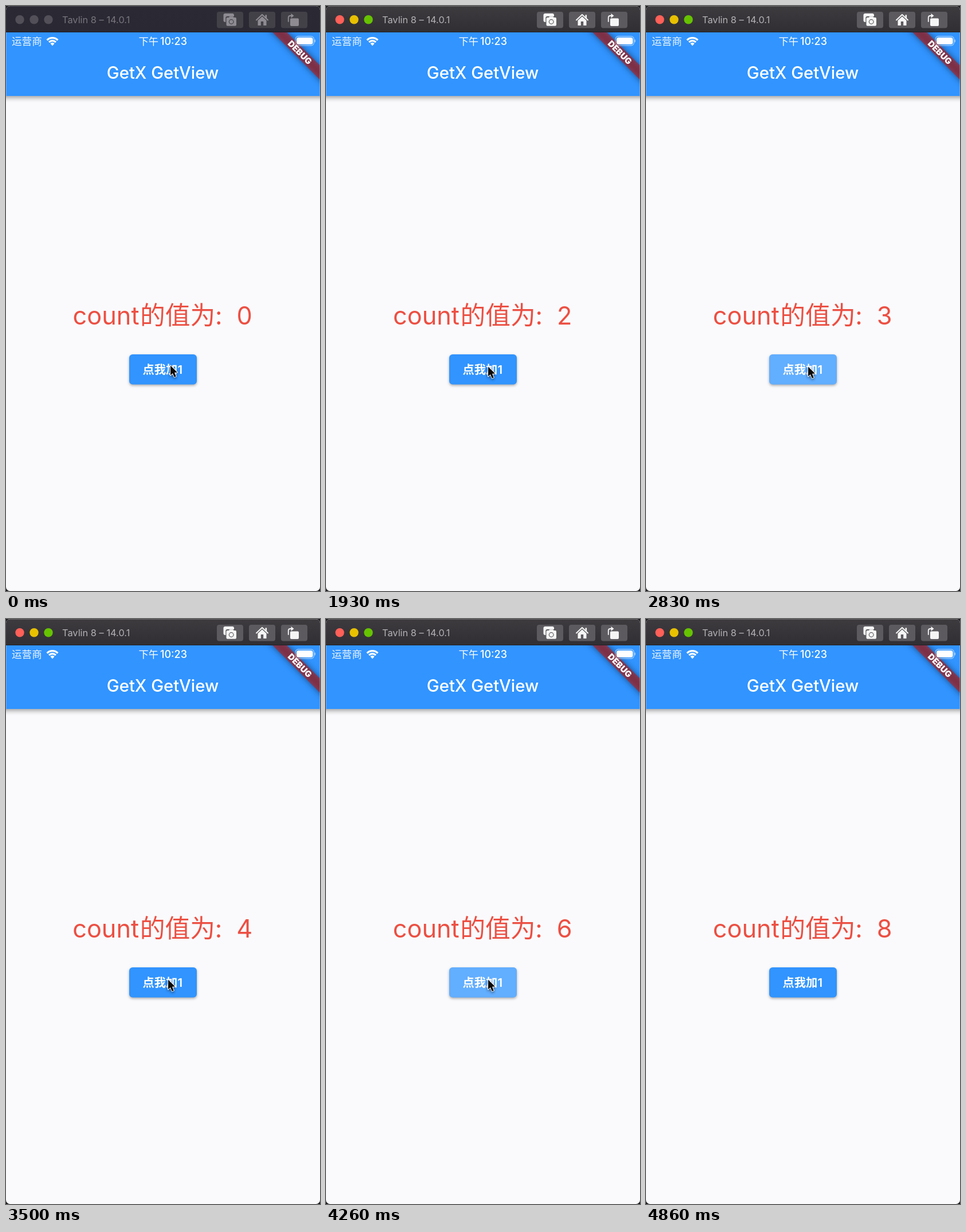
Write an HTML page with a canvas that moves like this. It is 548x1021 px and loops after 5.43 s.

```html
<!DOCTYPE html>
<html lang="zh-CN">
<head>
<meta charset="utf-8">
<title>GetX GetView</title>
<style>
html, body { margin: 0; width: 100%; height: 100%; overflow: hidden; background: #18181c; }
canvas { display: block; width: 548px; height: 1021px; }
</style>
</head>
<body>
<canvas id="stage" width="548" height="1021"></canvas>
<script>
const W = 548, H = 1021, LOOP = 5430;
const ctx = document.getElementById('stage').getContext('2d');
const LATIN = 'Inter, "Noto Sans CJK SC", "Noto Sans CJK", sans-serif';
const CJK = '"Noto Sans CJK SC", "Noto Sans CJK", sans-serif';
const BLUE = '#3194ff', RED = '#ec4f42';

// Each tap: time the counter steps, start of its ripple.
const TAPS = [
  [1270, 1055], [1930, 1930], [2700, 2700], [3500, 3500],
  [3790, 3790], [4120, 4120], [4290, 4290], [4460, 4460]
];
const BTN = { x: 215, y: 608, w: 118, h: 52.5, r: 6 };

const clamp = v => Math.max(0, Math.min(1, v));
const mix = (a, b, p) => a + (b - a) * p;
const easeOut = p => 1 - Math.pow(1 - clamp(p), 2.4);

function box(x, y, w, h, r, fill) {
  ctx.beginPath();
  ctx.roundRect(x, y, w, h, r);
  ctx.fillStyle = fill;
  ctx.fill();
}

function disc(x, y, r, fill) {
  ctx.beginPath();
  ctx.arc(x, y, r, 0, Math.PI * 2);
  ctx.fillStyle = fill;
  ctx.fill();
}

function poly(points, fill) {
  ctx.beginPath();
  points.forEach(([x, y]) => ctx.lineTo(x, y));
  ctx.closePath();
  ctx.fillStyle = fill;
  ctx.fill();
}

function text(str, x, y, font, fill, align = 'left') {
  ctx.font = font;
  ctx.fillStyle = fill;
  ctx.textAlign = align;
  ctx.fillText(str, x, y);
}

function shadow(color, blur, dy) {
  ctx.shadowColor = color;
  ctx.shadowBlur = blur;
  ctx.shadowOffsetY = dy;
}

function cameraIcon(ink, back) {
  box(379.5, 13, 18.5, 15, 3, ink);
  box(383.3, 18, 20, 18, 3, back);
  box(384.5, 20, 17.5, 14.8, 2, ink);
  box(389, 18.2, 8.5, 5, 2, ink);
  disc(393.2, 27.5, 4.4, back);
  disc(393.2, 27.5, 3.2, ink);
}

function homeIcon(ink, back) {
  ctx.strokeStyle = ink;
  ctx.lineWidth = 2;
  ctx.lineCap = ctx.lineJoin = 'round';
  ctx.beginPath();
  ctx.moveTo(437, 24.5);
  ctx.lineTo(447, 15);
  ctx.lineTo(457, 24.5);
  ctx.stroke();
  box(452.5, 15.5, 2.6, 6, 0, ink);
  poly([[447, 18.2], [454.5, 25.3], [454.5, 34], [439.5, 34], [439.5, 25.3]], ink);
  box(444.8, 27, 4.4, 7, 0, back);
}

function rotateIcon(ink) {
  box(496, 21.5, 15, 13.5, 2, ink);
  ctx.strokeStyle = ink;
  ctx.lineWidth = 1.8;
  ctx.beginPath();
  ctx.moveTo(492.8, 27);
  ctx.lineTo(492.8, 20.5);
  ctx.quadraticCurveTo(492.8, 17, 496.3, 17);
  ctx.lineTo(498, 17);
  ctx.stroke();
  poly([[497.5, 13], [502.5, 17], [497.5, 21]], ink);
}

function titleBar(active) {
  const g = ctx.createLinearGradient(0, 0, 0, 46);
  g.addColorStop(0, active ? '#3e3b3f' : '#2b2934');
  g.addColorStop(1, active ? '#302e33' : '#2a2833');
  ctx.fillStyle = g;
  ctx.fillRect(0, 0, W, 46);
  ctx.fillStyle = active ? 'rgba(255,255,255,.22)' : 'rgba(255,255,255,.14)';
  ctx.fillRect(0, 0, W, 1);
  ctx.fillStyle = 'rgba(0,0,0,.3)';
  ctx.fillRect(0, 45, W, 1);

  const lights = active ? ['#ff6058', '#e8c000', '#66c300'] : Array(3).fill('#524f58');
  lights.forEach((c, i) => disc(24 + 25 * i, 23.8, 7.7, c));
  text('Tavlin 8 – 14.0.1', 98, 30, '400 16.4px ' + LATIN, active ? '#b3b1b4' : '#77747c');

  const ink = active ? '#f6f5f6' : '#8e8c92';
  const back = active ? '#5c5a5e' : '#434148';
  [368, 424, 480].forEach(x => box(x, 10, 46, 28.5, 4, back));
  cameraIcon(ink, back);
  homeIcon(ink, back);
  rotateIcon(ink);
}

function debugRibbon() {
  const k = W / 375;
  ctx.save();
  ctx.beginPath();
  ctx.rect(0, 46, W, H);
  ctx.clip();
  ctx.translate(W, 46);
  ctx.rotate(Math.PI / 4);
  ctx.filter = 'blur(5.8px)';
  box(-90, 28 * k, 180, 12 * k, 0, 'rgba(0,0,0,.5)');
  ctx.filter = 'none';
  box(-90, 28 * k, 180, 12 * k, 0, 'rgba(183,28,28,.627)');
  text('DEBUG', 0, 34 * k + 5.3, '900 14.9px ' + LATIN, '#fff', 'center');
  ctx.restore();
}

function wifi() {
  const cx = 81, cy = 69;
  ctx.strokeStyle = '#fff';
  ctx.lineCap = 'butt';
  ctx.lineWidth = 3.2;
  [13.3, 8.4].forEach(r => {
    ctx.beginPath();
    ctx.arc(cx, cy, r, -Math.PI * .75, -Math.PI * .25);
    ctx.stroke();
  });
  ctx.beginPath();
  ctx.moveTo(cx, cy + .5);
  ctx.arc(cx, cy, 5, -Math.PI * .75, -Math.PI * .25);
  ctx.fillStyle = '#fff';
  ctx.fill();
}

function battery() {
  ctx.beginPath();
  ctx.roundRect(505, 53, 32.5, 16, 5);
  ctx.strokeStyle = 'rgba(255,255,255,.5)';
  ctx.lineWidth = 1.3;
  ctx.stroke();
  box(507, 55, 28.5, 12, 3.5, '#fff');
  box(538.3, 58.5, 1.8, 5, 1, 'rgba(255,255,255,.5)');
}

function appBar() {
  shadow('rgba(0,0,0,.38)', 8, 3);
  box(-10, 46, W + 20, 111, 0, BLUE);
  shadow('transparent', 0, 0);
  text('GetX GetView', 273.5, 127, '500 29.3px ' + LATIN, '#fff', 'center');
  debugRibbon();
  text('运营商', 10, 68, '400 17.6px ' + CJK, 'rgba(255,255,255,.92)');
  wifi();
  text('下午', 231.5, 68, '500 17.3px ' + CJK, '#fff');
  text('10:23', 269, 68, '500 18px ' + LATIN, '#fff');
  battery();
}

function counter(n) {
  const font = '400 43.3px ' + LATIN, y = 556;
  ctx.font = font;
  const dx = (ctx.measureText('0').width - ctx.measureText(n).width) / 2;
  text('count', 116.5 + dx, y, font, RED);
  text('的值为', 234 + dx, y, '400 43.8px ' + CJK, RED);
  text(':', 365 + dx, y, font, RED);
  text(n, 402.5 + dx, y, font, RED);
}

function ripple(age) {
  if (age < 0 || age >= 375) return;
  const p = easeOut(age / 225);
  const alpha = .24 * clamp(age / 75) * clamp((375 - age) / 150);
  const cx = BTN.x + BTN.w / 2, cy = BTN.y + BTN.h / 2;
  disc(mix(283, cx, p), mix(630, cy, p), mix(20, 72, p), `rgba(255,255,255,${alpha})`);
}

function button(t) {
  const { x, y, w, h, r } = BTN;
  shadow('rgba(0,0,0,.32)', 4, 2);
  box(x, y, w, h, r, BLUE);
  shadow('transparent', 0, 0);
  ctx.save();
  ctx.beginPath();
  ctx.roundRect(x, y, w, h, r);
  ctx.clip();
  TAPS.forEach(([at, start]) => { if (t >= at) ripple(t - start); });
  ctx.restore();
  text('点我加', 238.5, 642, '600 20.3px ' + CJK, '#fff');
  text('1', 299.5, 642, '600 20.3px ' + LATIN, '#fff');
}

function cursor(t) {
  if (t >= 4800) return;
  let x = 287, y = 627.5;
  if (t >= 1230) {
    const p = clamp((t - 1230) / 200);
    x = mix(285, 283, p);
    y = mix(627.5, 629.5, p);
  }
  const away = clamp((t - 4630) / 165) ** 2;
  ctx.save();
  ctx.translate(mix(x, 128, away), mix(y, 313, away));
  ctx.lineJoin = 'round';
  ctx.strokeStyle = '#fff';
  ctx.lineWidth = 2;
  shadow('rgba(0,0,0,.35)', 4, 2);
  const arrow = [[0, 0], [0, 17], [3.9, 13.4], [6.8, 20.2], [9.8, 18.9], [7, 12.3], [12, 12]];
  poly(arrow, '#000');
  ctx.stroke();
  shadow('transparent', 0, 0);
  poly(arrow, '#0a0a0a');
  ctx.restore();
}

function draw(t) {
  ctx.fillStyle = '#18181c';
  ctx.fillRect(0, 0, W, H);
  ctx.save();
  ctx.beginPath();
  ctx.roundRect(0, 0, W, H, 7);
  ctx.clip();
  ctx.fillStyle = '#fafafc';
  ctx.fillRect(0, 0, W, H);
  appBar();
  titleBar(t >= 560);
  ctx.fillStyle = 'rgba(255,255,255,.25)';
  ctx.fillRect(0, 46, 1, 111);
  ctx.fillRect(W - 1, 46, 1, 111);
  counter(String(TAPS.filter(([at]) => t >= at).length));
  button(t);
  cursor(t);
  ctx.restore();
}

const begin = performance.now();
function tick() {
  draw((performance.now() - begin) % LOOP);
  requestAnimationFrame(tick);
}
tick();
</script>
</body>
</html>
```
